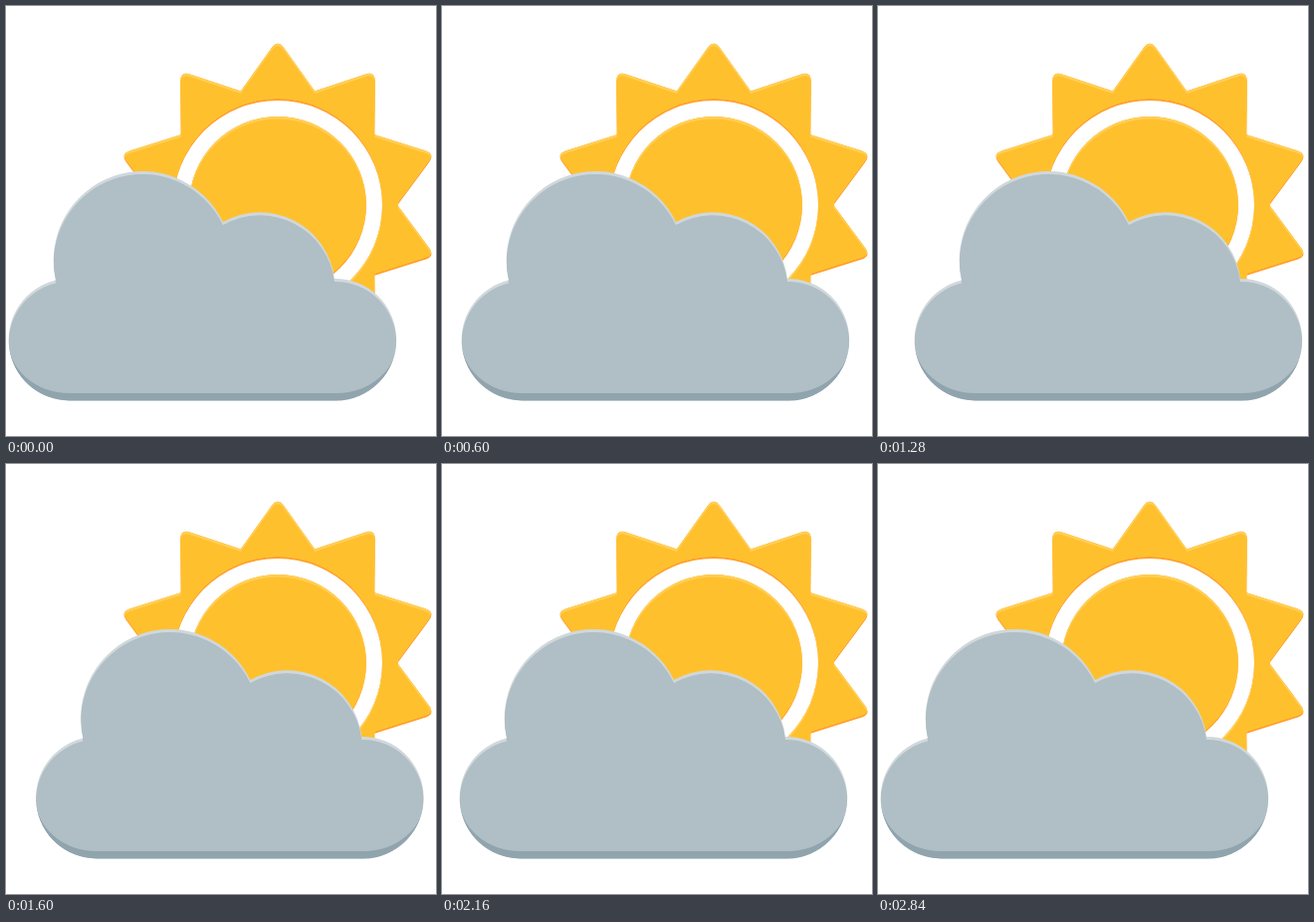
Recreate the animation shown at these times as an HTML page. Size 432 px wide and 432 px high, loop 2880 ms.

```html
<!DOCTYPE html>
<html lang="en">
<head>
<meta charset="utf-8">
<title>Sun and drifting cloud</title>
<style>
  html, body { margin: 0; width: 100%; height: 100%; overflow: hidden; background: #fff; }
  svg { display: block; width: 100%; height: 100%; }
</style>
</head>
<body>
<svg viewBox="0 0 432 432">
  <defs>
    <path id="sun" fill-rule="evenodd" clip-rule="evenodd"/>
    <path id="cloud" d="M63.5 396.5A61.25 61.25 0 0 1 50 275.6A89.5 89.5 0 0 1 218 217
      A75.5 75.5 0 0 1 330 274A61.25 61.25 0 0 1 332 396.5Z"/>
    <clipPath id="sunClip"><use href="#sun"/></clipPath>
    <clipPath id="cloudClip"><use href="#cloud"/></clipPath>
  </defs>

  <!-- shaded lower edges, lit upper edges, flat fill between -->
  <g clip-path="url(#sunClip)">
    <rect width="432" height="432" fill="#ff9f2a"/>
    <g transform="translate(0 -2)" clip-path="url(#sunClip)">
      <rect width="432" height="432" fill="#ffcf54"/>
      <use href="#sun" y="4.5" fill="#ffc02e"/>
    </g>
  </g>

  <g id="drift">
    <use href="#cloud" fill="#d0d8dc"/>
    <g clip-path="url(#cloudClip)">
      <use href="#cloud" y="3" fill="#b0bec5"/>
      <path fill="#90a4ae" d="M2.2 335A61.25 61.25 0 0 0 63.5 396.5H332A61.25 61.25 0 0 0 393.3 335
        A61.25 54 0 0 1 332 389H63.5A61.25 54 0 0 1 2.2 335Z"/>
    </g>
  </g>
</svg>
<script>
const CX = 273, CY = 200;
const LOOP = 2880, STEP = 40;
const KEYS = [[0, 0], [1200, 34], [1300, 34], [2840, 0], [LOOP, 0]];

const polar = (radius, degrees) => {
  const a = degrees * Math.PI / 180;
  return [CX + radius * Math.sin(a), CY - radius * Math.cos(a)];
};

// Point at the given distance from a towards b
const towards = ([ax, ay], [bx, by], distance) => {
  const k = distance / Math.hypot(bx - ax, by - ay);
  return [ax + (bx - ax) * k, ay + (by - ay) * k];
};

function starPath(rays, outer, inner, rounding) {
  const step = 360 / rays;
  let d = '';
  for (let i = 0; i < rays; i++) {
    const tip = polar(outer, i * step);
    const before = polar(inner, (i - 0.5) * step);
    const after = polar(inner, (i + 0.5) * step);
    d += `${i ? 'L' : 'M'}${before}L${towards(tip, before, rounding)}Q${tip} ${towards(tip, after, rounding)}`;
  }
  return d + 'Z';
}

const circlePath = r =>
  `M${CX - r} ${CY}a${r} ${r} 0 0 1 ${2 * r} 0a${r} ${r} 0 0 1 ${-2 * r} 0Z`;

document.getElementById('sun').setAttribute('d',
  starPath(10, 166.7, 120.3, 11) + circlePath(105) + circlePath(89));

function offsetAt(time) {
  const i = KEYS.findIndex(([t]) => t > time);
  const [t0, x0] = KEYS[i - 1], [t1, x1] = KEYS[i];
  return x0 + (x1 - x0) * (time - t0) / (t1 - t0);
}

const drift = document.getElementById('drift');
const start = performance.now();

function draw() {
  const time = (performance.now() - start) % LOOP;
  const x = offsetAt(Math.floor(time / STEP) * STEP);
  drift.setAttribute('transform', `translate(${x} 0)`);
  requestAnimationFrame(draw);
}
draw();
</script>
</body>
</html>
```
